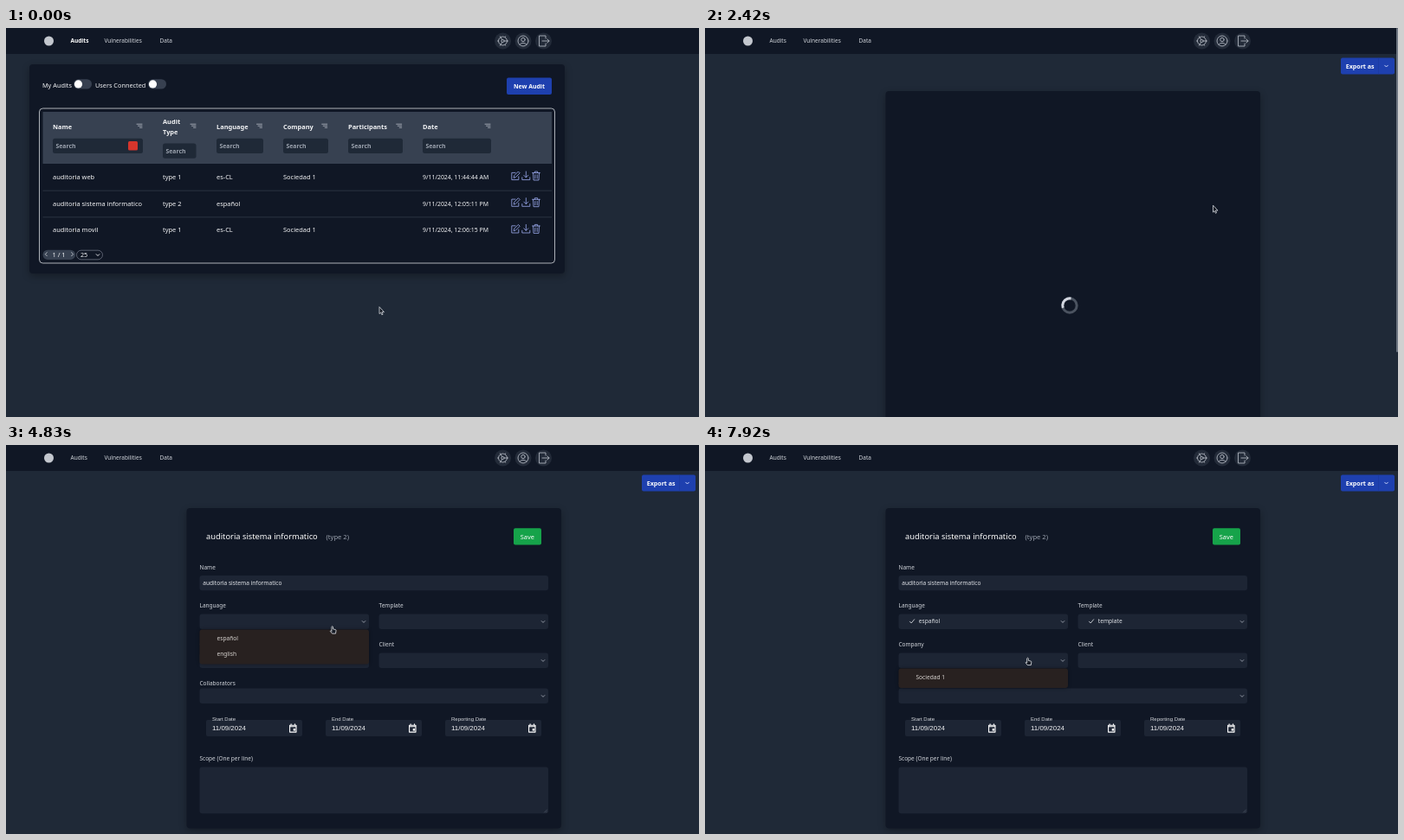
Write an HTML page with a canvas that moves like this. It is 800 px wide and 450 px high and loops after 8 s.

```html
<!DOCTYPE html>
<html lang="en">
<head>
<meta charset="utf-8">
<title>Audit manager</title>
<style>
html, body { margin: 0; width: 100%; height: 100%; overflow: hidden; background: #1f2937; }
canvas { display: block; width: 800px; height: 450px; }
</style>
</head>
<body>
<canvas id="stage" width="800" height="450"></canvas>
<script>
const ctx = document.getElementById('stage').getContext('2d');
const LOOP = 8000, PAGE_OPEN = 2420, FORM_READY = 2830;
const SANS = '"Noto Sans", sans-serif', ARIAL = '"Liberation Sans", Arial, sans-serif';
const DARK = '#101725', FIELD = '#1d2534', HEAD = '#374151', WHITE = '#f3f4f6', SOFT = '#d1d5db', BLUE = '#1e40af';

// Pointer path: time, x, y
const pointerPath = [
  [0, 431, 323], [840, 431, 323], [1170, 508, 245], [1420, 555, 222], [1670, 586.5, 205.5],
  [3420, 586.5, 205.5], [3830, 516, 200.5], [4000, 448, 201], [4330, 378, 205],
  [4750, 378, 206], [5000, 374, 217], [5500, 376, 220], [5670, 376, 220], [6170, 455, 206],
  [6500, 455, 206], [6750, 447, 220], [7000, 449, 222], [7090, 449, 222], [7750, 372.5, 246], [LOOP, 372.5, 246]
];

const selects = [
  { label: 'Language', x: 223.5, y: 195, w: 195.5, options: ['español', 'english'], open: 4580, pick: 5670 },
  { label: 'Template', x: 430.5, y: 195, w: 195.5, options: ['template'], open: 6330, pick: 7170 },
  { label: 'Company', x: 223.5, y: 240, w: 195.5, options: ['Sociedad 1'], open: 7920, pick: Infinity },
  { label: 'Client', x: 430.5, y: 240, w: 195.5 },
  { label: 'Collaborators', x: 223.5, y: 281, w: 402.5 }
];

const columns = [
  ['Name', 54, 104], ['Audit Type', 181, 38.5], ['Language', 243, 54],
  ['Company', 320, 52], ['Participants', 395, 63], ['Date', 481, 79]
];
const audits = [
  ['auditoria web', 'type 1', 'es-CL', 'Sociedad 1', '', '9/11/2024, 11:44:44 AM'],
  ['auditoria sistema informatico', 'type 2', 'español', '', '', '9/11/2024, 12:05:11 PM'],
  ['auditoria movil', 'type 1', 'es-CL', 'Sociedad 1', '', '9/11/2024, 12:06:15 PM']
];

function text(str, x, y, size = 7.5, color = WHITE, weight = 400, family = SANS) {
  ctx.font = `${weight} ${size}px ${family}`;
  ctx.fillStyle = color;
  ctx.fillText(str, x, y + size * 0.36);
}

function box(x, y, w, h, r, fill, stroke) {
  ctx.beginPath();
  ctx.roundRect(x, y, w, h, r);
  if (fill) { ctx.fillStyle = fill; ctx.fill(); }
  if (stroke) { ctx.strokeStyle = stroke; ctx.lineWidth = 0.8; ctx.stroke(); }
}

function disc(x, y, r, fill) {
  box(x - r, y - r, 2 * r, 2 * r, r, fill);
}

function icon(d, x, y, stroke, width = 0.9, fill) {
  const path = new Path2D(d);
  ctx.save();
  ctx.translate(x, y);
  ctx.lineCap = ctx.lineJoin = 'round';
  if (fill) { ctx.fillStyle = fill; ctx.fill(path); }
  ctx.strokeStyle = stroke;
  ctx.lineWidth = width;
  ctx.stroke(path);
  ctx.restore();
}

const chevron = (x, y, color = '#9ca3af') => icon('M-1.8-.8L0 1 1.8-.8', x, y, color);

function card(x, y, w, h) {
  ctx.save();
  ctx.shadowColor = 'rgba(0,0,0,.3)';
  ctx.shadowBlur = 9;
  ctx.shadowOffsetY = 3;
  box(x, y, w, h, 4, DARK);
  ctx.restore();
}

function drawNav(onList) {
  box(0, 0, 800, 30, 0, DARK);
  disc(49.5, 15, 5.5, '#c3c7ce');
  text('Audits', 74.5, 15, 6.5, onList ? '#fff' : SOFT, onList ? 600 : 500);
  text('Vulnerabilities', 113.5, 15, 6.5, SOFT, 500);
  text('Data', 177.5, 15, 6.5, SOFT, 500);
  for (const x of [573.5, 597, 620.5]) disc(x, 15, 9.5, '#232b39');
  icon('M5 0A5 5 0 1 1-5 0A5 5 0 1 1 5 0M1.6 0A1.6 1.6 0 1 1-1.6 0A1.6 1.6 0 1 1 1.6 0M1.6 0H6M-.8-1.4L-3-5.2M-.8 1.4L-3 5.2M-6 0H-5M3-5.2L2.5-4.3M3 5.2L2.5 4.3', 573.5, 15, '#aeb4be');
  icon('M6 0A6 6 0 1 1-6 0A6 6 0 1 1 6 0M2.2-1.5A2.2 2.2 0 1 1-2.2-1.5A2.2 2.2 0 1 1 2.2-1.5M-4 4.2Q0 .2 4 4.2', 597, 15, '#aeb4be');
  icon('M2.5-3V-6H-5V6H2.5V3M-1.5 0H6.5M4.3-2.2L6.5 0 4.3 2.2', 620.5, 15, '#aeb4be');
}

function drawToggle(label, x, trackX) {
  text(label, x, 66, 7.3);
  box(trackX, 59.2, 21, 11.4, 5.7, '#374050');
  disc(trackX + 5.5, 64.9, 4.6, '#fff');
}

function drawList(pointer) {
  card(27, 42, 618, 242);
  drawToggle('My Audits', 42, 78);
  drawToggle('Users Connected', 103, 164);
  box(578, 57.5, 52, 19.5, 2, BLUE);
  text('New Audit', 586, 67.5, 6.9, '#fff', 700);

  box(38.5, 93, 595, 179, 4, null, '#d5d8dd');
  box(42.5, 97, 587.5, 60, 0, HEAD);
  columns.forEach(([name, x, w], i) => {
    const twoLines = i === 1, top = twoLines ? 133.5 : 127.8;
    if (twoLines) {
      text('Audit', x, 108.5, 7.4, WHITE, 600);
      text('Type', x, 120, 7.4, WHITE, 600);
    } else text(name, x, 114.3, 7.4, WHITE, 600);
    icon('M-3-2H3M-1.5 0H3M.5 2H3', [154, 216, 292.5, 367.7, 453.7, 556][i], 113.2, '#b6bcc6', 0.8);
    box(x, top, w, 17.2, 2.5, '#1f2937');
    text('Search', x + 3.5, top + 8.6, 6.9, '#9ca3af', 600);
  });
  box(141, 131, 11, 10.5, 1.5, '#d5352c');

  audits.forEach((cells, row) => {
    const top = 157 + row * 30.7, mid = top + 15.4;
    if (pointer.y >= top && pointer.y < top + 30.7) box(42.5, top, 587.5, 30.7, 0, '#1d2735');
    if (row) box(42.5, top, 587.5, 0.8, 0, '#333c4a');
    cells.forEach((cell, i) => text(cell, columns[i][1], mid, i === 5 ? 6.9 : 7.45));
    const y = mid - 1.4, c = '#9cabef';
    icon('M0-3.6H-4.2V4.6H3.8V.8M-1.8 2L-1.2-.4 3.4-5 5.2-3.2.6 1.4Z', 588, y, c, 0.8);
    icon('M0-5V1.8M-2.5-.6L0 1.9 2.5-.6M-4.5 1.8V4.6H4.5V1.8', 600.3, y, c, 0.8);
    icon('M-4.4-3.4H4.4M-1.6-3.4V-5H1.6V-3.4M-3.5-3.4L-3 5H3L3.5-3.4M-1.2-1.2V3M1.2-1.2V3', 612, y, c, 0.8);
  });

  box(42.5, 256.7, 37.5, 11.3, 5.6, HEAD);
  icon('M1-2L-1 0 1 2', 46.3, 261.7, SOFT, 0.8);
  icon('M-1-2L1 0-1 2', 76.6, 261.7, SOFT, 0.8);
  text('1 / 1', 53.5, 262.5, 7.4);
  box(81.5, 257.2, 30, 10.6, 5.3, DARK, '#6b7280');
  text('25', 86, 262.5, 7.2);
  chevron(106, 262.5, WHITE);
}

function drawExport() {
  box(734, 34.5, 62, 19, 2, BLUE);
  box(777.5, 34.5, 0.5, 19, 0, '#1b3799');
  text('Export as', 739.7, 44.2, 7.1, '#fff', 600);
  chevron(786.5, 44, '#dbe3ff');
}

function drawLoading(t) {
  card(208.5, 73, 432.5, 400);
  const start = 2.8 + (t - PAGE_OPEN) / 1000 * 2 * Math.PI;
  ctx.lineWidth = 3;
  for (const [color, from, sweep] of [['#4b5360', 0, 7], ['#d3d7e0', start, 2.1]]) {
    ctx.beginPath();
    ctx.arc(421, 321, 8.2, from, from + Math.min(sweep, 2 * Math.PI));
    ctx.strokeStyle = color;
    ctx.stroke();
  }
}

function drawDate(label, x) {
  box(x, 318, 111, 19, 2, FIELD);
  text(label, x + 7, 317, 6, '#d6d9de', 400, ARIAL);
  text('11/09/2024', x + 7, 327.3, 7.9, WHITE, 400, ARIAL);
  icon('M-3.7-3.4H3.7V4.4H-3.7ZM-3.7-2H3.7M-2.2-5V-3.4M2.2-5V-3.4', x + 100.3, 327.7, '#fff', 1.1);
  box(x + 100.7, 328, 2.4, 2.6, 0, '#fff');
}

function drawMenu(s, t, pointer) {
  const top = s.y + 18.4;
  ctx.save();
  ctx.shadowColor = 'rgba(0,0,0,.35)';
  ctx.shadowBlur = 4;
  box(s.x, top, s.w, 5 + s.options.length * 17.5, 3, '#282120');
  ctx.restore();
  s.options.forEach((option, i) => {
    const y = top + 2 + i * 17.5;
    if (t < s.pick && pointer.y >= y && pointer.y < y + 17.5) box(s.x + 2, y, s.w - 4.5, 18.3, 2, '#43372f');
    text(option, s.x + 20, y + 8.7, 6.6, '#d8d4d0');
  });
}

function drawForm(t, pointer) {
  card(208.5, 73, 432.5, 370.5);
  text('auditoria sistema informatico', 231, 106, 9.3, '#fff', 500);
  text('(type 2)', 369.5, 106, 7.6, '#9ca3af');
  box(586, 96.2, 32, 19.3, 2, '#16a34a');
  text('Save', 593.8, 106, 7.4, '#fff');
  text('Name', 223.5, 141.3, 6.5, SOFT, 500);
  box(223.5, 151, 402.5, 17.3, 3, FIELD);
  text('auditoria sistema informatico', 227.3, 159.7, 6.58, '#e0e3e8');

  for (const s of selects) {
    text(s.label, s.x, s.y - (s.w > 200 ? 5.8 : 9.4), 6.5, SOFT, 500);
    box(s.x, s.y + 0.4, s.w, 17.6, 3, FIELD);
    chevron(s.x + s.w - 6, s.y + 9.4);
    if (t >= s.pick) {
      icon('M-2.5.2L-.8 2 2.6-2.2', s.x + 15.5, s.y + 9, SOFT);
      text(s.options[0], s.x + 23.3, s.y + 9, 6.6, '#e0e3e8');
    }
  }
  drawDate('Start Date', 231);
  drawDate('End Date', 369);
  drawDate('Reporting Date', 507);
  text('Scope (One per line)', 223.5, 362.8, 6.5, SOFT, 500);
  box(223.5, 372.5, 402.5, 53.8, 3, FIELD);
  icon('M-3 0L0-3M-1 0L0-1', 624.5, 425, '#6b7280', 0.5);

  selects.filter(s => isOpen(s, t)).forEach(s => drawMenu(s, t, pointer));
}

const isOpen = (s, t) => t >= s.open && t < s.pick + 80;

function pointerAt(t) {
  const i = pointerPath.findIndex(p => p[0] > t);
  const [t0, x0, y0] = pointerPath[i - 1], [t1, x1, y1] = pointerPath[i];
  const k = (t - t0) / (t1 - t0);
  return { x: x0 + (x1 - x0) * k, y: y0 + (y1 - y0) * k };
}

function drawPointer({ x, y }, t) {
  const overSelect = selects.some(s => x > s.x && x < s.x + s.w && y > s.y && y < s.y + 18);
  const hand = t < PAGE_OPEN ? t >= 1750 : t >= FORM_READY && overSelect;
  if (hand) icon('M-.8 5V.8Q0-.4.8.8V3.4L3.6 4Q4.4 4.2 4.3 5.2L3.8 8.6H-.2L-2.4 5.8Q-2.2 4.6-.8 5.6Z', x, y, '#e5e7eb', 0.8, '#161b25');
  else icon('M0 0V7.6L1.7 6.1 2.9 8.8 4.1 8.2 2.9 5.6H5.1Z', x, y, '#d5d8de', 0.8, '#161b25');
}

function draw(now) {
  const t = Math.round(Math.floor(now % LOOP * 0.012 + 0.05) * 100 / 12) * 10 % LOOP;
  const pointer = pointerAt(t), onList = t < PAGE_OPEN;
  box(0, 0, 800, 450, 0, '#1f2937');
  drawNav(onList);
  if (onList) drawList(pointer);
  else {
    drawExport();
    if (t < FORM_READY) drawLoading(t);
    else drawForm(t, pointer);
  }
  if (t >= 920 && !selects.some(s => isOpen(s, t))) {
    box(798, 0, 2, !onList && t < FORM_READY ? 375 : 433, 1, '#6f7783');
  }
  drawPointer(pointer, t);
  requestAnimationFrame(() => draw(performance.now()));
}
draw(0);
</script>
</body>
</html>
```
